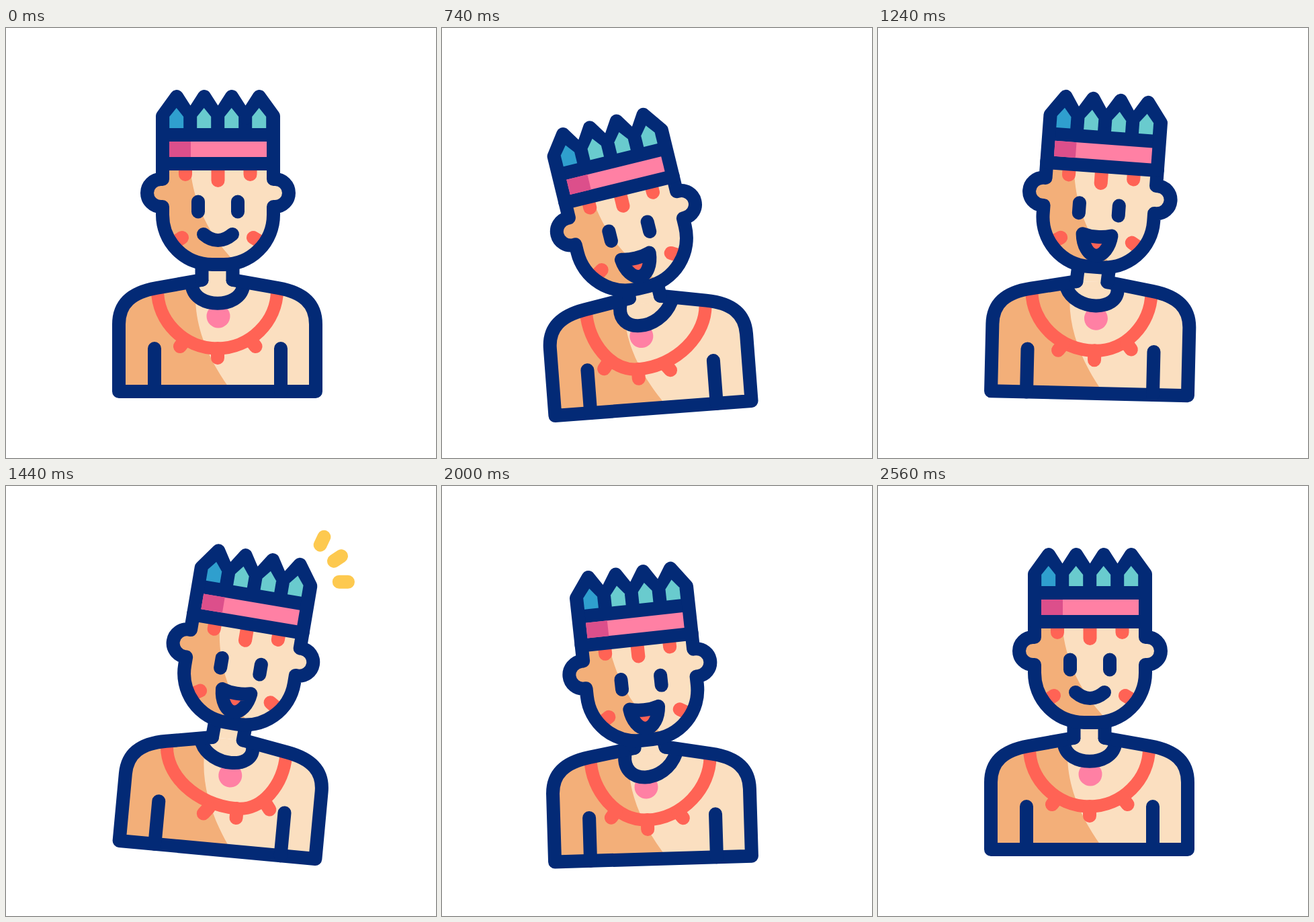
An HTML page for the animation above (3000 ms loop, 640 by 640 pixels).

```html
<!DOCTYPE html>
<html lang="en">
<head>
<meta charset="utf-8">
<title>Swaying figure</title>
<style>
  html, body { margin: 0; width: 100%; height: 100%; overflow: hidden; background: #fff; }
  svg { display: block; width: 100vw; height: 100vh; }
  .line { fill: none; stroke: #032a76; stroke-width: 20; stroke-linecap: round; stroke-linejoin: round; }
  .paint { fill: none; stroke: #ff6355; stroke-width: 20; stroke-linecap: round; }
  .skin { fill: #fbdfc0; }
  .shade { fill: #f3af79; }
</style>
</head>
<body>
<svg viewBox="0 0 640 640">
  <defs>
    <path id="torso" d="M291.5 375L224 387C187 393.5 168 410 168 441V541H461V441C461 410 442 393.5 405 387L337.5 375"/>
    <path id="face" d="M233 200V225H230.5A20.5 20.5 0 0 0 230.5 266H233V278A74 74 0 0 0 307 352H323A74 74 0 0 0 398 278V266H400.5A20.5 20.5 0 0 0 400.5 225H398V200"/>
    <clipPath id="torsoClip"><use href="#torso"/></clipPath>
    <clipPath id="faceClip"><use href="#face"/></clipPath>
  </defs>

  <g id="body">
    <use href="#torso" class="skin"/>
    <path class="shade" clip-path="url(#torsoClip)" d="M150 360H282V400C282 450 304 498 336 541H150Z"/>
    <path id="necklace" class="paint" style="stroke-width:19;stroke-linecap:butt"/>
    <path id="studs" class="paint"/>
    <circle id="pendant" r="17.5" fill="#ff80a4"/>
    <path id="collar" class="line" style="fill:#fbdfc0"/>
    <use href="#torso" class="line"/>
    <path class="line" d="M221 477V541M409 477V541"/>
  </g>

  <path id="throat" class="skin"/>
  <path id="neck" class="line"/>

  <g id="head">
    <use href="#face" class="skin"/>
    <path class="shade" clip-path="url(#faceClip)" d="M195 195H273C277 262 302 308 344 352H195Z"/>
    <path class="paint" d="M267 200V218M315.5 200V227M363.5 200V218M262 312L248 321M368 312L383 321"/>
    <use href="#face" class="line"/>
    <path id="crown" class="line" style="fill:#032a76"/>
    <g id="feathers"></g>
    <path fill="#ff80a4" d="M243 169H388V192H243Z"/>
    <path fill="#dc4f8b" d="M243 169H275V192H243Z"/>
    <path id="eyes" class="line"/>
    <path id="mouth" class="line" style="fill:#ff6355"/>
    <path id="sparks" class="line" style="stroke:#fdc94f"/>
  </g>
</svg>

<script>
const LOOP = 3000, BEGIN = 220, END = 2560;
const LEFT = 810, RIGHT = 1440, BACK = 2000;

const el = id => document.getElementById(id);
const set = (id, attrs) => { for (const k in attrs) el(id).setAttribute(k, attrs[k]); };
const mix = (a, b, u) => a + (b - a) * u;
const part = (t, a, b) => Math.min(1, Math.max(0, (t - a) / (b - a)));
const ease = u => (1 - Math.cos(Math.PI * u)) / 2;
const rad = deg => deg * Math.PI / 180;

// Rest, lean left, lean right, lean left again, rest. A lag delays the leans.
function sway(t, lag, left, right, back) {
  const stops = [BEGIN, LEFT + lag, RIGHT + lag, BACK + lag, END];
  const poses = [0, left, right, back, 0];
  return poses.slice(1).reduce(
    (v, p, i) => v + (p - poses[i]) * ease(part(t, stops[i], stops[i + 1])), 0);
}

// Turns a point about a pivot, then shifts it.
function place(x, y, px, py, dx, dy, deg) {
  const c = Math.cos(rad(deg)), s = Math.sin(rad(deg));
  return [px + dx + (x - px) * c - (y - py) * s, py + dy + (x - px) * s + (y - py) * c];
}

function drawCrown() {
  const step = 41, xs = [0, 1, 2, 3].map(i => 254 + i * step);
  const peaks = xs.map(x => `L${x} 102`).join(' ').split(' L')
    .join(' l20.5 32L');
  set('crown', { d: `M233 202V131${peaks}L398 131V202Z` });
  el('feathers').innerHTML = xs.map((x, i) =>
    `<path fill="${i ? '#69cbce' : '#2f9fce'}" d="M${x - 0.3} 119l10.5 13v17h-21v-17z"/>`).join('');
}

function drawChest(s, cx, cy) {
  const mx = 314.5 + 20 * s, my = 477 + cy * 0.6;
  const left = 49 + 10 * s, right = 49 - 10 * s;
  set('necklace', { d: `M225.5 387V390C225.5 437 ${mx - left} ${my} ${mx} ${my}`
    + `C${mx + right} ${my} 403.5 437 403.5 390V387` });
  const pos = Math.max(s, 0), neg = Math.max(-s, 0);
  const lx = 259 + 26 * pos - 14 * neg, ly = 474 + 13 * pos + cy * 0.4;
  const rx = 371.5 + 13 * pos - 29 * neg, ry = 474 + 10 * neg + cy * 0.4;
  set('studs', { d: `M${lx} ${ly}l7 -9M${mx + 0.5} ${my}v14M${rx} ${ry}l-7 -9` });
  set('pendant', { cx: 316 + cx, cy: 429 + cy * 0.5 });
  const y = 418 + cy * 1.33, k = cx * 1.33;
  set('collar', { d: `M277 385C${283 + k} ${y} ${347 + k} ${y} 353 385` });
}

function drawFace(t) {
  const blink = Math.max(0, ...[1060, 2240].map(c => 1 - Math.abs(t - c) / 120));
  const half = 7.5 * (1 - ease(blink)) + 0.01;
  set('eyes', { d: [286, 345].map(x => `M${x} ${266 - half}V${266 + half}`).join('') });

  // Closed, both lips share one curve; open, they part.
  const m = ease(part(t, BEGIN, 540)) - ease(part(t, 1960, 2500));
  const c = 315.5, w = 21.5, end = mix(307, 304, m);
  const lip = (dir, a, ay, b, y) =>
    `C${c + dir * a} ${ay} ${c + dir * b} ${y} `;
  const low = mix(316, 335, m), top = mix(316, 307, m);
  const la = mix(15, 20, m), ly = mix(312.5, 321, m), lb = mix(8, 11, m);
  const ty = mix(312.5, 306, m);
  set('mouth', { d: `M${c - w} ${end}` + lip(-1, la, ly, lb, low) + `${c} ${low}`
    + `C${c + lb} ${low} ${c + la} ${ly} ${c + w} ${end}`
    + lip(1, 15, ty, 8, top) + `${c} ${top}`
    + `C${c - 8} ${top} ${c - 15} ${ty} ${c - w} ${end}Z` });
}

// Three dashes shoot outwards: the tip runs ahead, the tail catches up.
function drawSparks(t) {
  const p = part(t, 1260, 1850);
  const tip = 48 + 31 * (1 - (1 - p) ** 3), tail = 48 + 31 * p ** 1.2;
  const ray = ([deg, far]) => {
    const a = rad(deg - 4 * p);
    const at = d => `${385.5 + Math.cos(a) * (d + far)} ${126.5 + Math.sin(a) * (d + far)}`;
    return `M${at(tail)}L${at(tip)}`;
  };
  const on = p > 0 && p < 1;
  set('sparks', { d: on ? [[-73, 5], [-42, 0], [-8, -1.5]].map(ray).join('') : '' });
}

function draw(t) {
  const turn = sway(t, 80, -4.9, 5.7, -2.1);
  const drop = sway(t, -65, 25, 0, 14.5);
  const tilt = sway(t, 0, -14.2, 9.6, -6.2);
  const hx = sway(t, 60, -15.8, 19, -9.5);
  const hy = sway(t, -65, 34, 0, 26.5);
  set('body', { transform: `translate(0 ${drop}) rotate(${turn} 314.5 541)` });
  set('head', { transform: `translate(${hx} ${hy}) rotate(${tilt} 315.5 360.5)` });

  const base = x => place(x, 375, 314.5, 541, 0, drop, turn);
  const chin = x => place(x, 348, 315.5, 360.5, hx, hy, tilt);
  const [a, b, c, d] = [chin(291.5), base(291.5), base(337.5), chin(337.5)];
  set('throat', { d: `M${a}L${b}L${c}L${d}Z` });
  set('neck', { d: `M${a}L${b}M${c}L${d}` });

  drawChest(turn / 4.6, sway(t, -60, -11, 8, -9), (hy - drop) * 0.8);
  drawFace(t);
  drawSparks(t);
}

drawCrown();
const start = performance.now();
function tick() {
  draw((performance.now() - start) % LOOP);
  requestAnimationFrame(tick);
}
tick();
</script>
</body>
</html>
```
